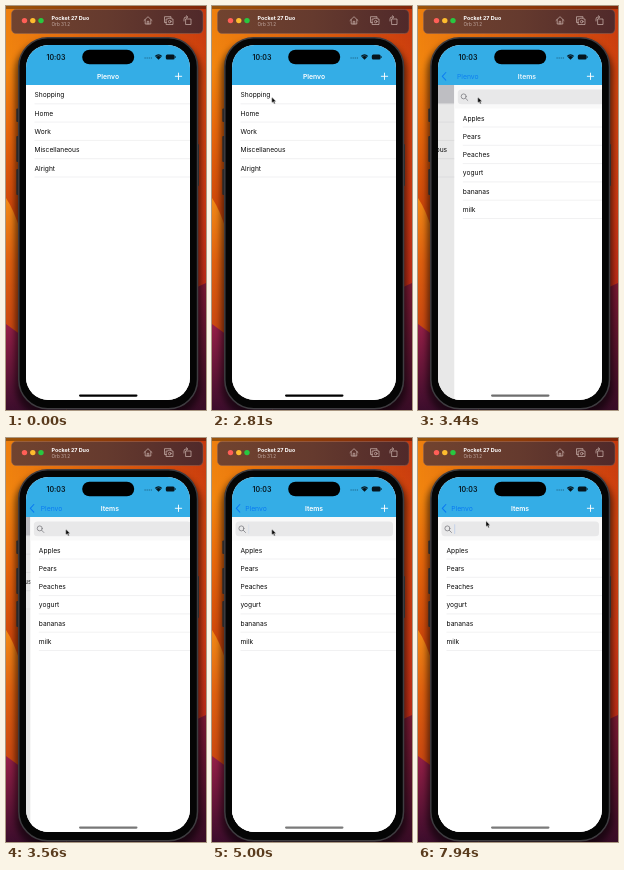
Recreate the animation shown at these times as an HTML page. Size 200 px wide and 404 px high, loop 8000 ms.

```html
<!DOCTYPE html>
<html lang="en">
<head>
<meta charset="utf-8">
<title>Shopping list demo</title>
<style>
@property --push { syntax: '<number>'; inherits: true; initial-value: 0; }

html, body { margin: 0; width: 100%; height: 100%; overflow: hidden; background: #2a1019; }
svg { display: block; width: 100vw; height: 100vh; font-family: Inter, Roboto, sans-serif; }

.stage { animation: push 8s infinite; }
.row { font-size: 6.65px; fill: #0b0b0b; }
.rule { stroke: #e3e3e5; stroke-width: .5; }
.bold { font-weight: 600; }
.nav { font-size: 6.8px; }
.line { fill: none; stroke-linecap: round; stroke-linejoin: round; }
.shadow { filter: blur(3px); opacity: .55; }

/* navigation transition, all driven by --push */
.lists { transform: translateX(calc(var(--push) * -49.2px)); }
.dim { opacity: calc(var(--push) * .1); }
.items { transform: translateX(calc((1 - var(--push)) * 164px)); }
.titleOut { transform: translateX(calc(var(--push) * -58px)); opacity: calc(1 - var(--push) * 1.25); }
.back { transform: translateX(calc((1 - var(--push)) * 58px)); opacity: var(--push); }
.chevron { opacity: var(--push); }
.titleIn { transform: translateX(calc((1 - var(--push)) * 70px)); opacity: var(--push); }
.home { opacity: calc(1 - var(--push) * .48); }

.selected { animation: select 8s step-end infinite; }
.focus { animation: focus 8s step-end infinite; }
.caret { animation: blink 1s linear infinite; }
.cursor { animation: point 8s ease-in-out infinite; }

@keyframes push {
  0%, 39.5% {
    --push: 0;
    animation-timing-function: linear(0, .091 5%, .267 10%, .446 15%, .598 20%, .717 25%,
      .804 30%, .911 40%, .961 50%, .983 60%, .993 70%, .997 80%, 1);
  }
  48.5%, 100% { --push: 1; }
}
@keyframes select { 0% { opacity: 0; } 36.75%, 100% { opacity: 1; } }
@keyframes focus { 0% { opacity: 0; } 53.2%, 100% { opacity: 1; } }
@keyframes blink {
  0% { opacity: .08; }
  6%, 19% { opacity: 0; }
  31%, 84% { opacity: 1; }
  94% { opacity: .2; }
  100% { opacity: .08; }
}
@keyframes point {
  0%, .7% { transform: translate(206px, 300px); }
  10.5% { transform: translate(96px, 112px); }
  14.8%, 21% { transform: translate(89.7px, 103.5px); }
  30.5%, 66.3% { transform: translate(59.7px, 91px); }
  71.2%, 100% { transform: translate(67.9px, 82.8px); }
}
</style>
</head>
<body>
<svg class="stage" viewBox="0 0 200 404" preserveAspectRatio="none">
  <defs>
    <linearGradient id="left" x2="0" y2="1">
      <stop offset="0" stop-color="#ee800f"/>
      <stop offset=".15" stop-color="#f2860f"/>
      <stop offset=".3" stop-color="#e8690c"/>
      <stop offset=".5" stop-color="#cf470b"/>
    </linearGradient>
    <linearGradient id="right" x2="0" y2="1">
      <stop offset="0" stop-color="#c5380e"/>
      <stop offset=".2" stop-color="#d2450f"/>
      <stop offset=".5" stop-color="#cf3a14"/>
      <stop offset=".7" stop-color="#c02d18"/>
    </linearGradient>
    <linearGradient id="wave" x2="0" y2="1">
      <stop offset="0" stop-color="#f28a16"/>
      <stop offset=".3" stop-color="#e0600f"/>
      <stop offset="1" stop-color="#b02a12"/>
    </linearGradient>
    <linearGradient id="plum" x2="0" y2="1">
      <stop offset="0" stop-color="#972048"/>
      <stop offset="1" stop-color="#3c0d2c"/>
    </linearGradient>
    <linearGradient id="maroon" x2="0" y2="1">
      <stop offset="0" stop-color="#7d1a34"/>
      <stop offset="1" stop-color="#380c26"/>
    </linearGradient>
    <linearGradient id="fade">
      <stop offset="0" stop-color="#000"/>
      <stop offset="1" stop-color="#fff"/>
    </linearGradient>
    <linearGradient id="bar">
      <stop offset="0" stop-color="#71432f"/>
      <stop offset=".5" stop-color="#653a2e"/>
      <stop offset="1" stop-color="#50292a"/>
    </linearGradient>
    <mask id="fadeRight"><rect width="200" height="404" fill="url(#fade)"/></mask>
    <clipPath id="screen"><rect x="20" y="39" width="164" height="355" rx="22.500"/></clipPath>
  </defs>

  <!-- desktop -->
  <rect width="200" height="404" fill="url(#left)"/>
  <rect width="200" height="404" fill="url(#right)" mask="url(#fadeRight)"/>
  <path d="M0 192Q8 204 14 224L60 404H0Z" fill="url(#wave)"/>
  <path d="M0 318L60 362V404H0Z" fill="url(#plum)"/>
  <path d="M200 277L150 300L60 404H200Z" fill="url(#maroon)"/>
  <rect width="200" height="3" opacity=".35"/>

  <rect class="shadow" x="9" y="36" width="186" height="374" rx="30"/>

  <!-- simulator title bar -->
  <rect x="5.500" y="3.500" width="191.500" height="24" rx="4.500" fill="url(#bar)" stroke="#866056" stroke-width=".5"/>
  <circle cx="18.500" cy="14.600" r="2.700" fill="#ff5f57"/>
  <circle cx="26.800" cy="14.600" r="2.700" fill="#febc2e"/>
  <circle cx="35" cy="14.600" r="2.700" fill="#28c840"/>
  <text x="45.500" y="14" font-weight="700" font-size="5.400" fill="#fff">Pocket 27 Duo</text>
  <text x="45.500" y="20.200" font-size="4.700" fill="#c4aca5">Orb 31.2</text>
  <g class="line" stroke="#cdb6b0" stroke-width=".7">
    <path d="M138 14.500L142 10.700L146 14.500M139.200 13.700V18H144.800V13.700M141.200 18V15.300H142.800V18"/>
    <path d="M160.300 16.500H158.500V10.700H165V12M160.500 13H162L162.500 12.200H165L165.500 13H167V18.500H160.500Z"/>
    <circle cx="163.750" cy="15.600" r="1.300"/>
    <path d="M180 13H185V18.500H180ZM178 15V13Q178 11 180 11H181.500M180.300 9.700L181.700 11L180.300 12.300"/>
  </g>

  <!-- phone -->
  <g fill="#29282a">
    <rect x="10.300" y="102.500" width="3" height="13.500" rx="1"/>
    <rect x="10.300" y="130" width="3" height="26" rx="1"/>
    <rect x="10.300" y="163" width="3" height="26" rx="1"/>
    <rect x="190" y="138" width="3" height="42" rx="1"/>
  </g>
  <rect x="12.800" y="31.800" width="178.700" height="371" rx="29" fill="#050505" stroke="#3e3c40" stroke-width="1.500"/>

  <g clip-path="url(#screen)">
    <rect x="20" y="39" width="164" height="355" fill="#fff"/>
    <g class="lists">
      <rect x="20" y="79" width="164" height="315" fill="#fff"/>
      <rect class="selected" x="20" y="79" width="164" height="18.500" fill="#d1d1d6"/>
      <g id="listRows"></g>
    </g>
    <rect class="dim" x="20" y="79" width="164" height="315"/>
    <g class="items">
      <rect x="20" y="79" width="164" height="315" fill="#fff"/>
      <rect x="20" y="79" width="164" height="23.500" fill="#f9f9f9"/>
      <rect x="23.500" y="83.500" width="157.500" height="14.800" rx="3.500" fill="#e8e8e9"/>
      <g class="line" stroke="#7d7d82" stroke-width=".8">
        <circle cx="29.400" cy="90.400" r="2.500"/>
        <path d="M31.300 92.300L33.500 94.500"/>
      </g>
      <g class="focus"><rect class="caret" x="36.200" y="86.200" width="1" height="9.800" rx=".4" fill="#2f74e8"/></g>
      <g id="itemRows"></g>
    </g>

    <rect x="20" y="39" width="164" height="40" fill="#34ade6"/>
    <g class="nav">
      <text class="titleOut bold" x="102" y="72.800" text-anchor="middle" fill="#fff">Plenvo</text>
      <text class="titleIn bold" x="102" y="72.800" text-anchor="middle" fill="#fff">Items</text>
      <text class="back" x="44" y="72.800" text-anchor="middle" fill="#0a7af2">Plenvo</text>
    </g>
    <path class="chevron line" d="M27.800 66.500L24.300 70.300L27.800 74.100" stroke="#0a7af2" stroke-width="1.100"/>
    <path class="line" d="M169.300 70.300H175.700M172.500 67.100V73.500" stroke="#fff" stroke-width=".9"/>
    <rect class="home" x="73" y="388.500" width="58.500" height="2.200" rx="1.100"/>
  </g>

  <!-- status bar -->
  <text x="50" y="53.600" class="bold" font-size="7" text-anchor="middle" fill="#06151d">10:03</text>
  <rect x="76.200" y="43.700" width="52" height="14.600" rx="7.300"/>
  <path d="M138.500 52H146" stroke="#1d6487" stroke-width="1.100" stroke-dasharray="1.200 .9"/>
  <path d="M148.800 50Q152.500 46.300 156.200 50L152.500 53.700Z" fill="#06151d"/>
  <path d="M149.500 50.700Q152.500 48.200 155.500 50.700" class="line" stroke="#34ade6" stroke-width=".4"/>
  <rect x="159.800" y="48.500" width="8.800" height="5" rx="1.500" fill="#06151d"/>
  <path d="M169.300 50.200V51.900" stroke="#06151d" stroke-width=".8"/>

  <path class="cursor" d="M0 0V6L1.400 4.800L2.300 6.900L3.400 6.400L2.500 4.400H4.300Z" fill="#000" stroke="#fff" stroke-width=".4"/>
</svg>
<script>
const rowHeight = 18.3;

function fillRows(id, top, labels) {
  document.getElementById(id).innerHTML = labels.map((label, i) => {
    const bottom = top + rowHeight * (i + 1);
    return `<text class="row" x="28.5" y="${bottom - 6.5}">${label}</text>
      <path class="rule" d="M28.5 ${bottom}H184"/>`;
  }).join('');
}

fillRows('listRows', 79.5, ['Shopping', 'Home', 'Work', 'Miscellaneous', 'Alright']);
fillRows('itemRows', 102.7, ['Apples', 'Pears', 'Peaches', 'yogurt', 'bananas', 'milk']);
</script>
</body>
</html>
```
